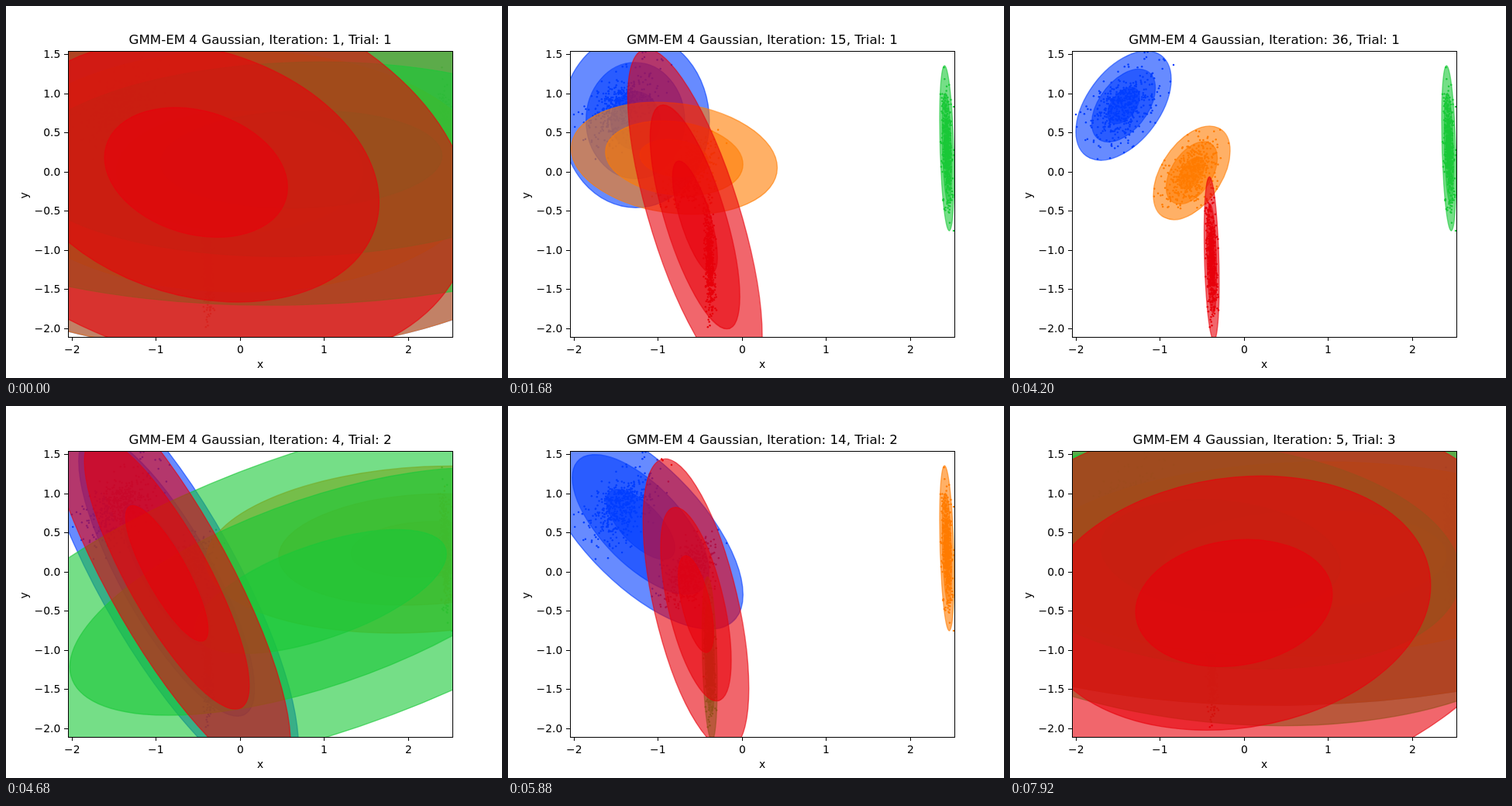
An HTML page with a canvas for the animation above (8 s loop, 640 px wide and 480 px high).

```html
<!DOCTYPE html>
<html lang="en">
<head>
<meta charset="utf-8">
<title>Gaussian mixture fitting</title>
<style>
  html, body { margin: 0; width: 100%; height: 100%; overflow: hidden; background: #fff; }
  canvas { display: block; }
</style>
</head>
<body>
<canvas id="plot" width="640" height="480"></canvas>
<script>
const ctx = document.getElementById('plot').getContext('2d');
const STEP_MS = 120, LOOP_MS = 8000;
const COLORS = ['#023eff', '#ff7c00', '#1ac938', '#e8000b'];
const AXES = { left: 80, top: 58, right: 576, bottom: 427 };

// A Gaussian in pixels; w and h are 3-sigma half extents, r is the correlation.
const gaussian = (cx, cy, w, h, r) => ({ cx, cy, w, h, r });
const UPPER = gaussian(146.5, 128.5, 61.5, 70.5, -0.48);
const MIDDLE = gaussian(234.5, 215.3, 49.5, 60.3, -0.47);
const LOWER = gaussian(260.2, 326, 9.7, 105.5, 0.3);
const RIGHT = gaussian(566.3, 183.5, 9.3, 106.5, 0.33);
const CLUSTERS = [UPPER, MIDDLE, LOWER, RIGHT];

// The Gaussian fitted to a mixture that takes the given share of each cluster.
function blend(...shares) {
  const total = shares.reduce((a, b) => a + b);
  const mean = value => shares.reduce((sum, s, i) => sum + s * value(CLUSTERS[i]), 0) / total;
  const cx = mean(g => g.cx), cy = mean(g => g.cy);
  const w = Math.sqrt(mean(g => g.w ** 2 + 9 * (g.cx - cx) ** 2));
  const h = Math.sqrt(mean(g => g.h ** 2 + 9 * (g.cy - cy) ** 2));
  const covariance = mean(g => g.r * g.w * g.h + 9 * (g.cx - cx) * (g.cy - cy));
  return gaussian(cx, cy, w, h, covariance / (w * h));
}

const cloud = blend(1, 1, 1, 1);
const rightHeavy = blend(0.18, 0.22, 0.12, 0.48);
const leftHeavy = blend(0.34, 0.27, 0.29, 0.1);
const start = [cloud, cloud, rightHeavy, leftHeavy];

// Fits in the order blue, orange, green, red; ease is the ease-out power of the way there.
const key = (iteration, fits, ease = 1) => ({ iteration, fits, ease });
const trials = [
  [
    key(1, start),
    key(9, [blend(0.5, 0.45, 0.05), gaussian(182, 168.4, 190.5, 75.6, 0.7),
            RIGHT, blend(0.24, 0.22, 0.54)]),
    key(22, [UPPER, blend(0.01, 0.98, 0.004, 0.006), RIGHT, blend(0, 0.38, 0.62)], 1.5),
    key(36, [UPPER, MIDDLE, RIGHT, LOWER], 2.5)
  ],
  [
    key(1, start),
    key(4, [blend(0.42, 0.22, 0.355, 0.002), blend(0.01, 0.07, 0, 0.92),
            blend(0.05, 0.05, 0.4, 0.5), blend(0.4, 0.28, 0.32)]),
    key(14, [blend(0.72, 0.28), RIGHT, LOWER, blend(0.02, 0.6, 0.38)], 2.2),
    key(26, [UPPER, RIGHT, LOWER, MIDDLE], 1.8)
  ],
  [
    key(1, [rightHeavy, rightHeavy, leftHeavy, cloud]),
    key(5, [rightHeavy, rightHeavy, blend(0.38, 0.26, 0.16, 0.2), blend(0.13, 0.21, 0.5, 0.16)])
  ]
];

let seed = 7;
function random() {
  seed = (seed * 16807) % 2147483647;
  return seed / 2147483647;
}

function sample({ cx, cy, w, h, r }) {
  const radius = Math.min(2.95, Math.sqrt(-2 * Math.log(random()))) / 3;
  const angle = 2 * Math.PI * random();
  const u = radius * Math.cos(angle), v = radius * Math.sin(angle);
  return [cx + w * u, cy + h * (r * u + Math.sqrt(1 - r * r) * v)];
}

const outliers = [[211, 76], [85, 140], [575, 130], [575, 290]];
const points = [...outliers, ...CLUSTERS.flatMap(g => Array.from({ length: 480 }, () => sample(g)))];

function mix(a, b, k) {
  const between = name => a[name] + (b[name] - a[name]) * k;
  return gaussian(...['cx', 'cy', 'w', 'h', 'r'].map(between));
}

function fitsAt(keys, iteration) {
  const next = Math.max(1, keys.findIndex(k => k.iteration >= iteration));
  const from = keys[next - 1], to = keys[next];
  const progress = Math.min(1, (iteration - from.iteration) / (to.iteration - from.iteration));
  const k = 1 - (1 - progress) ** to.ease;
  return from.fits.map((g, i) => mix(g, to.fits[i], k));
}

function logDensity({ cx, cy, w, h, r }, [x, y]) {
  const u = (x - cx) / w, v = (y - cy) / h, q = 1 - r * r;
  return -4.5 * (u * u - 2 * r * u * v + v * v) / q - Math.log(w * h * Math.sqrt(q));
}

function drawPoints(fits) {
  for (const p of points) {
    const scores = fits.map(g => logDensity(g, p));
    ctx.fillStyle = COLORS[scores.indexOf(Math.max(...scores))];
    ctx.beginPath();
    ctx.arc(p[0], p[1], 1.25, 0, 2 * Math.PI);
    ctx.fill();
  }
}

function drawGaussian({ cx, cy, w, h, r }, color) {
  ctx.fillStyle = ctx.strokeStyle = color;
  ctx.lineWidth = 1.39;
  for (const sigma of [1, 2, 3]) {
    const s = sigma / 3;
    ctx.save();
    ctx.transform(w * s, h * r * s, 0, h * s * Math.sqrt(1 - r * r), cx, cy);
    ctx.beginPath();
    ctx.arc(0, 0, 1, 0, 2 * Math.PI);
    ctx.restore();
    ctx.fill();
    ctx.stroke();
  }
}

function text(string, x, y, align = 'center', size = 13.89) {
  ctx.font = `${size}px "DejaVu Sans", sans-serif`;
  ctx.textAlign = align;
  ctx.fillText(string.replace('-', align === 'right' || size < 14 ? '\u2212' : '-'), x, y);
}

function drawAxes(title) {
  const { left, top, right, bottom } = AXES;
  ctx.fillStyle = ctx.strokeStyle = '#000';
  ctx.lineWidth = 1;
  ctx.strokeRect(left + 0.5, top + 0.5, right - left, bottom - top);
  ctx.beginPath();
  for (let v = -2; v <= 2; v++) {
    const x = Math.floor(302.2 + 108.5 * v);
    ctx.moveTo(x + 0.5, bottom);
    ctx.lineTo(x + 0.5, bottom + 5);
    text(String(v), x + 0.3, 448);
  }
  for (let v = -2; v <= 1.5; v += 0.5) {
    const y = Math.round(213.7 - 101.1 * v);
    ctx.moveTo(left - 5, y + 0.5);
    ctx.lineTo(left, y + 0.5);
    text(v.toFixed(1), 70.3, y + 5, 'right');
  }
  ctx.stroke();
  text('x', 328, 467);
  ctx.save();
  ctx.translate(28, 244.5);
  ctx.rotate(-Math.PI / 2);
  text('y', 0, 0);
  ctx.restore();
  text(title, 328, 49, 'center', 16.67);
}

function draw(time) {
  let iteration = Math.floor((time % LOOP_MS) / STEP_MS) + 1, trial = 0;
  while (trial < trials.length - 1 && iteration > trials[trial].at(-1).iteration)
    iteration -= trials[trial++].at(-1).iteration;
  const fits = fitsAt(trials[trial], iteration);

  ctx.fillStyle = '#fff';
  ctx.fillRect(0, 0, 640, 480);
  ctx.save();
  ctx.beginPath();
  ctx.rect(AXES.left, AXES.top, AXES.right - AXES.left, AXES.bottom - AXES.top);
  ctx.clip();
  drawPoints(fits);
  ctx.globalAlpha = 0.6;
  fits.forEach((g, i) => drawGaussian(g, COLORS[i]));
  ctx.restore();
  drawAxes(`GMM-EM 4 Gaussian, Iteration: ${iteration}, Trial: ${trial + 1}`);
}

const startTime = performance.now();
function tick() {
  draw(performance.now() - startTime);
  requestAnimationFrame(tick);
}
tick();
</script>
</body>
</html>
```
